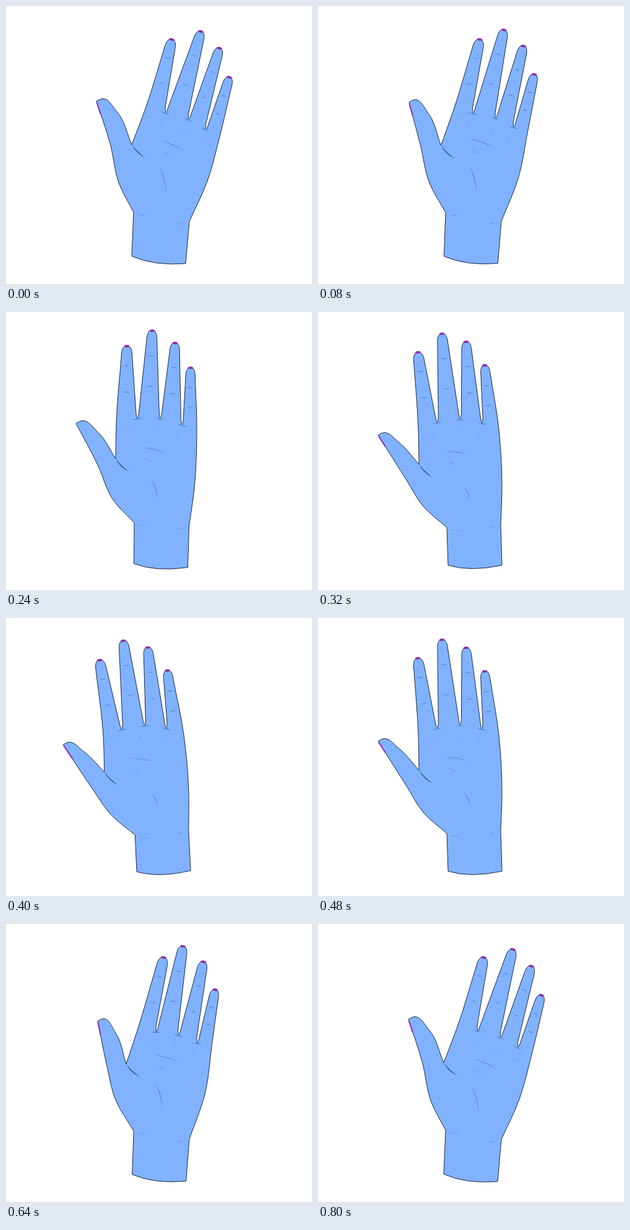
Write an HTML page with a canvas that moves like this. It is 494x449 px and loops after 0.88 s.

```html
<!DOCTYPE html>
<html lang="en">
<head>
<meta charset="utf-8">
<title>Waving hand</title>
<style>
  html, body { margin: 0; width: 100%; height: 100%; overflow: hidden; background: #fff; }
  canvas { display: block; }
</style>
</head>
<body>
<canvas id="stage" width="494" height="449"></canvas>
<script>
const ctx = document.getElementById('stage').getContext('2d');
const STEP = 80;
const SKIN = '#80b2ff', INK = '#1d2940', NAIL = '#9429ac';

// Key points (x, y pairs) of the hand as it turns.
// thumb: heel, joint, tip, inner bend, crotch. roots: finger bases from index to pinky.
const right = {
  turn: [0], thumbNail: [20], flank: [325,283],
  thumb: [183,288, 168,222, 146,154, 180,172, 203,224],
  roots: [225,166, 257,173, 294,184, 322,200, 345,211],
  tips: [268,53, 315,40, 345,67, 361,114]
};
const halfRight = {
  turn: [0.1], thumbNail: [20], flank: [321,275],
  thumb: [177,284, 162,225, 148,157, 177,176, 194,226],
  roots: [212,172, 242,175, 278,180, 308,193, 333,190],
  tips: [255,53, 286,35, 319,60, 338,105]
};
const upright = {
  turn: [0.5], thumbNail: [0], flank: [304,285],
  thumb: [172,302, 148,247, 113,180, 150,196, 177,237],
  roots: [178,180, 212,173, 249,173, 284,183, 308,190],
  tips: [195,54, 236,29, 273,49, 298,89]
};
const left = {
  turn: [1], thumbNail: [20], flank: [297,280],
  thumb: [170,314, 142,270, 97,199, 131,211, 163,246],
  roots: [162,190, 193,179, 230,174, 265,180, 292,190],
  tips: [161,64, 200,34, 239,47, 269,85]
};

function mix(a, b, k) {
  return Object.fromEntries(Object.keys(a).map(key =>
    [key, a[key].map((v, i) => v + (b[key][i] - v) * k)]));
}

const swing = [right, mix(right, halfRight, 0.5), halfRight, upright, left, mix(left, upright, -0.3)];

const add = (p, v, k = 1) => [p[0] + v[0] * k, p[1] + v[1] * k];
const middle = (a, b) => [(a[0] + b[0]) / 2, (a[1] + b[1]) / 2];
const distance = (a, b) => Math.hypot(b[0] - a[0], b[1] - a[1]);
const pairs = list => Array.from({ length: list.length / 2 }, (_, i) => list.slice(2 * i, 2 * i + 2));

function direction(a, b) {
  const len = distance(a, b) || 1;
  return [(b[0] - a[0]) / len, (b[1] - a[1]) / len];
}

function buildHand(pose) {
  const t = pose.turn[0];
  const roots = pairs(pose.roots);
  const fingers = pairs(pose.tips).map((tip, i) => {
    const base = middle(roots[i], roots[i + 1]);
    const axis = direction(base, tip), side = [-axis[1], axis[0]];
    const shoulder = add(tip, axis, -14), half = 8.5 - 0.3 * i;
    return {
      tip, base, axis, side,
      shoulders: [add(shoulder, side, -half), add(shoulder, side, half)],
      feet: [add(add(roots[i], axis, 9), side, 2), add(add(roots[i + 1], axis, 9), side, -2)]
    };
  });
  const [heel, joint, thumbTip, inner, crotch] = pairs(pose.thumb);
  return {
    roots, fingers, heel, joint, thumbTip, inner, crotch,
    flank: pose.flank, turn: t, thumbNail: pose.thumbNail[0],
    cuffL: [203 + 7 * t, 404 + 5 * t], cuffR: [290 + 7 * t, 416 - 7 * t],
    wristL: [206 + 2 * t, 333 + 15 * t], wristR: [296 - t, 348 - 4 * t]
  };
}

const curve = (a, b, c) => ctx.bezierCurveTo(...a, ...b, ...c);

// Smooth curve through the points; its two ends may form corners.
function smooth(...pts) {
  const last = pts.length - 1;
  const tangents = pts.map((p, i) => {
    if (i === 0) return direction(p, pts[1]);
    if (i === last) return direction(pts[i - 1], p);
    const before = pts[i - 1], after = pts[i + 1];
    const blend = add([0, 0], direction(before, p), distance(p, after));
    return direction([0, 0], add(blend, direction(p, after), distance(before, p)));
  });
  ctx.lineTo(...pts[0]);
  for (let i = 0; i < last; i++) {
    const reach = distance(pts[i], pts[i + 1]) / 3;
    curve(add(pts[i], tangents[i], reach), add(pts[i + 1], tangents[i + 1], -reach), pts[i + 1]);
  }
}

function traceFinger({ tip, axis, side, shoulders: [a, b] }) {
  ctx.lineTo(...a);
  curve(add(a, axis, 8), add(tip, side, -4.5), tip);
  curve(add(tip, side, 4.5), add(b, axis, 8), b);
}

function traceHand(h) {
  ctx.beginPath();
  ctx.moveTo(...h.cuffL);
  smooth(h.wristL, h.heel, h.joint, h.thumbTip);
  smooth(h.thumbTip, add(h.thumbTip, [8, -4]), h.inner, h.crotch);
  smooth(h.crotch, h.roots[0], h.fingers[0].shoulders[0]);
  h.fingers.forEach((finger, i) => {
    traceFinger(finger);
    const next = h.fingers[i + 1];
    if (!next) return;
    ctx.lineTo(...finger.feet[1]);
    ctx.quadraticCurveTo(...add(h.roots[i + 1], [0, 6]), ...next.feet[0]);
  });
  smooth(h.fingers[3].shoulders[1], h.roots[4], h.flank, h.wristR);
  ctx.lineTo(...h.cuffR);
  ctx.quadraticCurveTo((h.cuffL[0] + h.cuffR[0]) / 2 - 8, 420, ...h.cuffL);
  ctx.closePath();
}

// A crease is a thin lens that tapers at both ends.
function crease(a, b, width = 1, color = '#6896e0', bend = 0) {
  const [dx, dy] = direction(a, b), mid = middle(a, b);
  ctx.beginPath();
  ctx.moveTo(...a);
  ctx.quadraticCurveTo(...add(mid, [dy, -dx], 2 * bend + width), ...b);
  ctx.quadraticCurveTo(...add(mid, [dy, -dx], 2 * bend - width), ...a);
  ctx.fillStyle = color;
  ctx.fill();
}

function drawCreases(h) {
  h.fingers.forEach(({ tip, base, axis, side }, i) => {
    const length = distance(tip, base);
    for (const part of [0.27 + 0.025 * i, 0.62 + 0.015 * i]) {
      const spot = add(tip, axis, -part * length);
      crease(add(spot, side, -5), add(spot, side, 5), 1.6, '#5b89d2', 0.6);
    }
  });

  for (let i = 1; i < 4; i++) {
    const root = h.roots[i], along = direction(h.roots[i - 1], h.roots[i + 1]);
    crease(add(root, along, -9), add(root, along, 9), 1.2, '#4268a6');
    crease(add(root, [-9, 16]), add(root, [-4, 22]));
  }

  const across = add(h.roots[4], h.crotch, -1);
  const palm = (u, v) => add(add(h.crotch, across, u), [0, 110], v);
  const t = h.turn;
  crease(palm(0.32, -0.03), palm(0.62, 0.18), 1.2, '#5b89d2', 1.5);
  crease(palm(0.33, 0.12), palm(0.48, 0.26));
  crease(palm(0.31 + 0.24 * t, 0.36 + 0.24 * t), palm(0.39 + 0.24 * t, 0.77 + 0.08 * t), 1.2, '#5b89d2', 3);
  crease(h.crotch, add(h.crotch, [22, 21]), 1.5, '#2c4674', -2);
  crease(add(h.wristL, [6, 3]), add(h.wristL, [24, 6]));
  crease(add(h.wristR, [-22, 5]), add(h.wristR, [-8, 2]));
}

function drawNails(h) {
  ctx.fillStyle = ctx.strokeStyle = NAIL;
  for (const { tip, axis, side } of h.fingers) {
    ctx.beginPath();
    ctx.ellipse(...add(tip, axis, -1.2), 4.2, 1.9, Math.atan2(side[1], side[0]), 0, 2 * Math.PI);
    ctx.fill();
  }
  const along = direction(h.thumbTip, h.joint);
  ctx.beginPath();
  ctx.moveTo(...add(h.thumbTip, along, 2));
  ctx.lineTo(...add(h.thumbTip, along, 2 + h.thumbNail));
  ctx.lineWidth = 2;
  if (h.thumbNail) ctx.stroke();
}

function drawHand(h) {
  ctx.fillStyle = '#fff';
  ctx.fillRect(0, 0, 494, 449);
  traceHand(h);
  ctx.fillStyle = SKIN;
  ctx.fill();
  ctx.lineWidth = 1;
  ctx.lineJoin = 'round';
  ctx.strokeStyle = INK;
  ctx.stroke();
  drawCreases(h);
  drawNails(h);
}

const hands = swing.map(buildHand);

function frame(now) {
  const step = Math.floor(now / STEP) % 11;
  drawHand(hands[Math.min(step, 10 - step)]);
  requestAnimationFrame(frame);
}
drawHand(hands[0]);
requestAnimationFrame(frame);
</script>
</body>
</html>
```
